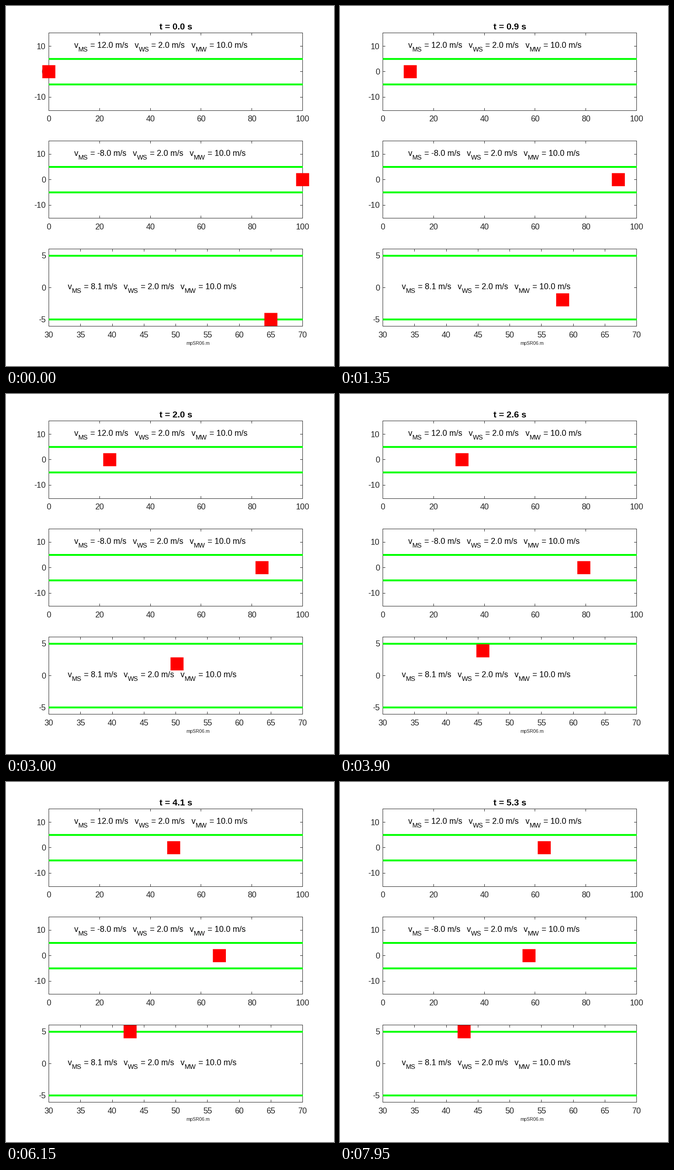
Animation of 716x783 px, one loop 8000 ms. Source, as a matplotlib script:

```python
import math

import matplotlib.pyplot as plt
from matplotlib.animation import FuncAnimation
from matplotlib.patches import Rectangle

W, H, DPI = 716, 783, 100
PT = 72 / DPI                      # points per pixel
LEFT, RIGHT = 93.5, 647.5
HALF_HEIGHT = 84.1
TICK = 5.5
SIZE = 17.6                        # main font size in pixels
SUB = 0.8 * SIZE
HALF_BOX = 14.2
INK = "#262626"
CHAR_EM = {"M": 0.833, "S": 0.667, "W": 0.944}

plt.rcParams["font.family"] = "Liberation Sans"
fig = plt.figure(figsize=(W / DPI, H / DPI), dpi=DPI, facecolor="white")
ax = fig.add_axes([0, 0, 1, 1])
ax.set_xlim(0, W)
ax.set_ylim(H, 0)
ax.axis("off")


def pixel(v):
    return math.floor(v) + 0.5


def label(x, y, s, size=SIZE, color=INK, ha="left", **kw):
    return ax.text(x, y, s, fontsize=size * PT, color=color, ha=ha,
                   va="baseline", **kw)


def line(xs, ys, color=INK, width=1, z=1):
    ax.plot(xs, ys, color=color, lw=width * PT, zorder=z, snap=False,
            solid_capstyle="butt", solid_joinstyle="miter")


def velocity(x, y, sub, value):
    """Draw one 'v_sub = value m/s' term and return where the next starts."""
    after = x + 0.5 * SIZE + sum(CHAR_EM[c] for c in sub) * SUB + 0.278 * SIZE
    text = f"= {value:.1f} m/s"
    label(x, y, "v", color="black", zorder=6)
    label(x + 0.5 * SIZE, y + 8.3, sub, SUB, "black", zorder=6)
    label(after, y, text, color="black", zorder=6)
    digits = sum(c.isdigit() for c in text)
    narrow = sum(c in " ./" for c in text) + 3
    minus = 0.333 if value < 0 else 0
    return after + (0.584 + 0.833 + 0.5 + 0.278 * narrow
                    + 0.556 * digits + minus) * SIZE


class Panel:
    def __init__(self, center, xmin, xmax, xstep, yticks, text_at, v_ms):
        self.center, self.xmin = center, xmin
        self.scale = (RIGHT - LEFT) / (xmax - xmin)
        top, bottom = pixel(center - HALF_HEIGHT), pixel(center + HALF_HEIGHT)

        line([LEFT, RIGHT, RIGHT, LEFT, LEFT],
             [top, top, bottom, bottom, top])
        for x in range(xmin, xmax + 1, xstep):
            px, _ = self.to_px(x, 0)
            line([pixel(px)] * 2, [bottom, bottom - TICK])
            line([pixel(px)] * 2, [top, top + TICK])
            label(px, center + 108.3, str(x), ha="center")
        for y in yticks:
            _, py = self.to_px(0, y)
            line([LEFT, LEFT + TICK], [pixel(py)] * 2)
            line([RIGHT, RIGHT - TICK], [pixel(py)] * 2)
            label(87, py + 6.2, str(y), ha="right")
        for bank in (-5, 5):
            py = self.to_px(0, bank)[1]
            line([LEFT, RIGHT + 0.5], [py, py], "#00ff00", 4, 2)

        x, y = self.to_px(*text_at)
        for sub, value in (("MS", v_ms), ("WS", 2), ("MW", 10)):
            x = velocity(x, y + 3.4, sub, value)

        self.box = Rectangle((0, 0), 2 * HALF_BOX, 2 * HALF_BOX, fc="#ff0000",
                             lw=0, zorder=5, snap=False)
        ax.add_patch(self.box)

    def to_px(self, x, y):
        return LEFT + (x - self.xmin) * self.scale, self.center - y * self.scale

    def move(self, x, y):
        px, py = self.to_px(x, y)
        self.box.set_xy((px - HALF_BOX, py - HALF_BOX))


# Third swimmer heads 160 degrees from the current and halts at the far bank.
HEADING = math.radians(160)
VX, VY = 2 + 10 * math.cos(HEADING), 10 * math.sin(HEADING)
ARRIVAL = 3.0

downstream = Panel(142.9, 0, 100, 20, (-10, 0, 10), (10, 10), 12)
upstream = Panel(377.7, 0, 100, 20, (-10, 0, 10), (10, 10), -8)
crossing = Panel(612.5, 30, 70, 5, (-5, 0, 5), (33, 0), math.hypot(VX, VY))

title = label(370.5, 51, "", 1.1 * SIZE, "black", "center", weight="bold")
label(419.5, 737, "mpSR06.m", 10.3, ha="center")


def update(frame):
    t = (frame // 3) / 10
    title.set_text(f"t = {t:.1f} s")
    downstream.move(12 * t, 0)
    upstream.move(100 - 8 * t, 0)
    swim = min(t, ARRIVAL)
    crossing.move(65 + VX * swim, min(-5 + VY * swim, 5))
    return title, downstream.box, upstream.box, crossing.box


anim = FuncAnimation(fig, update, frames=160, interval=50, repeat=True,
                     repeat_delay=0, blit=False)
plt.show()
```
